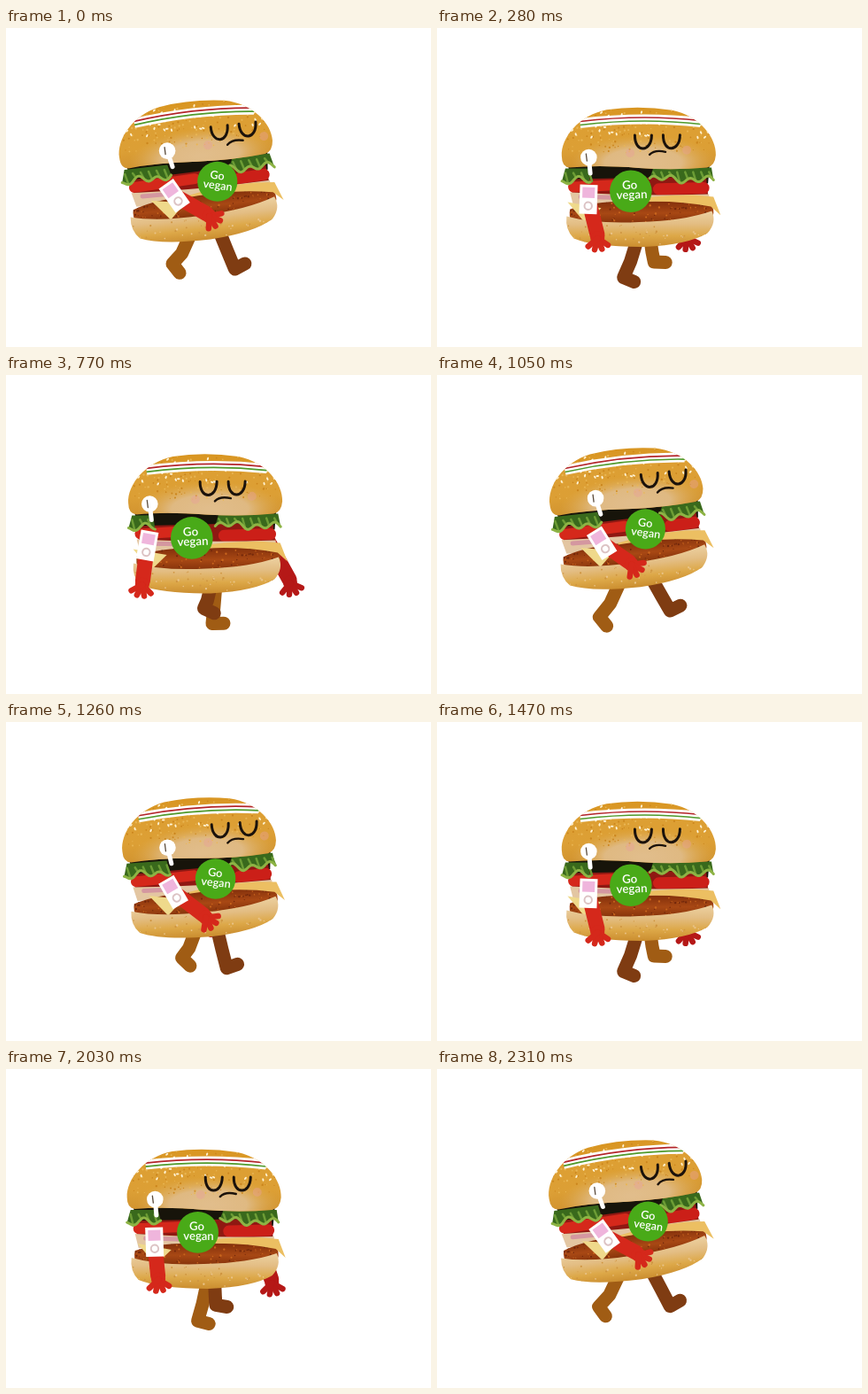
These frames come from a looping animation (480x360 px, 2380 ms). An HTML page with a canvas:

```html
<!DOCTYPE html>
<html lang="en">
<head>
<meta charset="utf-8">
<title>Walking burger</title>
<style>
html, body { margin: 0; width: 100%; height: 100%; overflow: hidden; background: #fff; }
canvas { display: block; }
</style>
</head>
<body>
<canvas id="stage" width="480" height="360"></canvas>
<script>
const ctx = document.getElementById('stage').getContext('2d');
const STEP = 70, CYCLE = 17;
const RED = '#d5281b', FAR_RED = '#b51817', INK = '#1b120b';
const TOP = 'M-87-32C-88-53-67-78-36-84Q0-89 38-83C70-76 88-51 87-32Q86-20 77-18Q40-15 0-18Q-45-22-78-19Q-87-20-87-32Z';
const BASE = 'M-82 36Q-50 45 0 43Q50 42 82 31Q88 44 77 56Q55 69 5 71Q-50 71-74 61Q-84 51-82 36Z';

const { sin, cos, PI } = Math;
const rad = deg => deg * PI / 180;

function seeded(s) {
  return () => (s = (s * 16807) % 2147483647) / 2147483647;
}

function at(x, y, deg, draw) {
  ctx.save();
  ctx.translate(x, y);
  ctx.rotate(rad(deg));
  draw();
  ctx.restore();
}
function disc(x, y, r, color, ry = r) {
  ctx.fillStyle = color;
  ctx.beginPath();
  ctx.ellipse(x, y, r, ry, 0, 0, 7);
  ctx.fill();
}
function line(color, width, ...pts) {
  ctx.strokeStyle = color;
  ctx.lineWidth = width;
  ctx.lineCap = ctx.lineJoin = 'round';
  ctx.beginPath();
  for (let i = 0; i < pts.length; i += 2) ctx.lineTo(pts[i], pts[i + 1]);
  ctx.stroke();
}
function curve(color, width, d) {
  ctx.strokeStyle = color;
  ctx.lineWidth = width;
  ctx.stroke(new Path2D(d));
}
function shape(color, d) {
  ctx.fillStyle = color;
  ctx.fill(new Path2D(d));
}
function blend(gradient, ...colors) {
  colors.forEach((c, i) => gradient.addColorStop(i / (colors.length - 1), c));
  return gradient;
}
function shade(y0, y1, ...colors) {
  return blend(ctx.createLinearGradient(0, y0, 0, y1), ...colors);
}
function speckle(seed, count, y, h, ...colors) {
  const rnd = seeded(seed);
  for (let i = 0; i < count; i++)
    disc(160 * rnd() - 80, y + h * rnd(), 0.5 + 0.7 * rnd(), colors[i % colors.length]);
}
function clipped(d, draw) {
  ctx.save();
  ctx.clip(new Path2D(d));
  draw();
  ctx.restore();
}

function hand(x, y, deg, color) {
  at(x, y, deg, () => {
    disc(4, 0, 8, color);
    for (let a = -48; a <= 48; a += 32)
      line(color, 6.5, 4, 0, 3 + 14 * cos(rad(a)), 15 * sin(rad(a)));
  });
}

function lettuce(from, to) {
  const edge = x => -6 + 3 * sin(x * 0.3) + 2 * sin(x * 0.13 + 1) + x * x / 2500;
  const rim = [];
  for (let x = from; x <= to; x += 2) rim.push(x, edge(x));
  ctx.fillStyle = '#39691c';
  ctx.beginPath();
  ctx.moveTo(from + 4, -18);
  for (let i = 0; i < rim.length; i += 2) ctx.lineTo(rim[i], rim[i + 1]);
  ctx.lineTo(to - 4, -18);
  ctx.fill();
  for (let x = from + 4; x < to - 2; x += 9) line('#6c9c35', 2.5, x, -13, x + 3, edge(x + 3));
  line('#8db344', 3, ...rim);
}

function filling(turn) {
  const gapL = turn - 75, gapR = turn - 9;
  shape('#17140a', 'M-80-22L80-22L78 0L-76 0Z');
  shape('#8f1812', 'M-74-6L76-8L78 14L-76 12Z');
  line(RED, 12, -74, 3, gapL + 25, 1);
  line('#cb1f18', 13, gapR + 10, 6, 73, 5);
  shape('#e3c6a2', 'M-78 9Q0 14 79 12L80 26L-74 25Z');
  line('#d497a0', 5, -66, 14, -28, 15);
  // patty
  clipped('M-78 28Q-50 18 0 20Q60 18 82 24Q87 35 80 42Q0 52-76 43Q-80 36-78 28Z', () => {
    ctx.fillStyle = shade(18, 48, '#7d2c0a', '#a84814', '#7a2c08');
    ctx.fillRect(-90, 15, 180, 40);
    speckle(41, 110, 20, 26, '#c9651d', '#71270b');
  });
  // cheese
  shape('#ecbf62', 'M-15 19Q20 12 62 13L84 15L92 36L81 26Q35 17-15 21Z');
  const x = turn - 82;
  shape(turn > 16 ? '#efd98b' : '#fff', `M${x - 20} 20L${x + 18} 27L${x} 44Z`);
  lettuce(-87, gapL);
  lettuce(gapR, 86);
}

function bottomBun() {
  clipped(BASE, () => {
    ctx.fillStyle = shade(32, 72, '#ecd0a0', '#e3bd83', '#dda848', '#c98b2d');
    ctx.fillRect(-90, 28, 180, 50);
    speckle(23, 50, 46, 24, '#cf9540', '#e9c388');
  });
}

function topBun() {
  clipped(TOP, () => {
    ctx.fillStyle = shade(-88, -15, '#d8941f', '#dd9f33', '#dc9f35', '#d0922f');
    ctx.fillRect(-90, -90, 180, 80);
    ctx.save();
    ctx.translate(5, -24);
    ctx.scale(1, 0.38);
    ctx.fillStyle = blend(ctx.createRadialGradient(0, 0, 5, 0, 0, 82),
      '#e1bd8b', '#dfb982', 'rgba(221,170,80,0)');
    ctx.fillRect(-90, -90, 180, 180);
    ctx.restore();
    speckle(5, 170, -84, 50, '#cc861d', '#e9b654');
    const rnd = seeded(11);
    for (let i = 0; i < 42; i++)
      at(156 * rnd() - 78, -84 + 32 * rnd(), 180 * rnd(), () => disc(0, 0, 1.8, '#fff2d2', 1));
    ctx.lineCap = 'butt';
    const stripe = (color, w, y) => curve(color, w, `M-66 ${y}Q4 ${y - 8} 70 ${y}`);
    stripe('#fff', 11, -69);
    stripe('#b3242a', 1.7, -71);
    stripe('#4f9a2c', 1.7, -67);
  });
}

function face(turn) {
  at(turn, -47, 0, () => {
    ctx.globalAlpha = 0.4;
    disc(-31, 12, 5, '#e9a09a');
    disc(33, 9, 5, '#e9a09a');
    ctx.globalAlpha = 1;
    ctx.lineCap = 'round';
    for (const x of [-16, 16])
      curve(INK, 3, `M${x - 9.5}-8C${x - 10} 12 ${x + 9} 12 ${x + 9.5}-8`);
    curve(INK, 2.4, 'M-9 14Q-3 8 9 11');
  });
}

function badge(x, y, r, tilt) {
  disc(x, y, r, '#49aa18');
  at(x, y, tilt, () => {
    ctx.fillStyle = '#fff';
    ctx.textAlign = 'center';
    ctx.font = `600 ${r * 0.56}px Lato, sans-serif`;
    ctx.fillText('Go', -1, -2.5);
    ctx.fillText('vegan', 1, 8.5);
  });
}

function earphone(x, y, lean) {
  line('#fff', 5, x, y, x + lean, y + 18);
  disc(x, y, 9.3, '#fff');
  line('#5a4a3a', 1.3, x - 3, y - 4, x - 2, y + 4);
}

function player(x, y, tilt) {
  at(x, y, tilt, () => {
    ctx.fillStyle = '#fff';
    ctx.fillRect(-10, -16, 20, 33);
    ctx.fillStyle = '#efb5dc';
    ctx.fillRect(-7, -13, 14, 12);
    ctx.strokeStyle = '#dcc3c4';
    ctx.lineWidth = 2;
    ctx.beginPath();
    ctx.arc(0, 8, 4.2, 0, 7);
    ctx.stroke();
  });
}

// c, s: the leg's own swing; sway, bob: motion shared with the body
function leg(color, c, s, sway, bob, bodyY) {
  const hipX = 232 + 18 * c - 3 * s - 7 * sway, hipY = bodyY + 62;
  const x = 227 + 40 * c - 8 * s - 4 * sway;
  const y = 268.5 - 6.5 * bob + 9 * s + 6 * sway;
  const toe = rad(12 - 42 * c);
  line(color, 15, hipX, hipY, (hipX + x) / 2, (hipY + y) / 2 + 3 - 3 * c,
    x, y, x + 13 * cos(toe), y + 13 * sin(toe));
}

function draw(step) {
  const a = 2 * PI * (step + 0.9) / CYCLE;
  const c = cos(a), s = sin(a), bob = cos(2 * a);
  const x = 224 - 5.5 * c + 1.5 * s - 1.5 * bob;
  const y = 171.5 - 5.5 * bob + 1.5 * c;
  const turn = 26 + 20 * c;

  ctx.fillStyle = '#fff';
  ctx.fillRect(0, 0, 480, 360);

  const farX = 285 - 58 * c - 18 * s, farY = 219 - 18 * bob + 9 * c;
  line(FAR_RED, 17, 278 - 22 * c, y - 8, farX, farY);
  hand(farX, farY, 65 + 8 * c - 17 * bob, FAR_RED);

  leg('#a05c14', -c, -s, c, bob, y);
  leg('#7f3c12', c, s, c, bob, y);

  at(x, y, -3.6 - 3.6 * bob, () => {
    filling(turn);
    bottomBun();
    topBun();
    face(turn);
  });

  earphone(168.5 + 15.5 * c + 4 * s - 3 * bob, y - 30, 4 + 2.5 * bob);
  badge(219.5 + 19 * c + 4 * s, y + 7.5 - 3 * c, 23.5 - c, 8 * c);

  const armX = 169.5 + 21.5 * c + 5 * s - 2 * bob, armY = y + 17.5 + 3 * c;
  const wristX = 179 + 48 * c + 12 * s - 2 * bob, wristY = 222 - 12 * bob - 3 * c;
  line(RED, 17, armX, armY, wristX, wristY);
  hand(wristX, wristY, 81 - 41 * c - 5 * s, RED);
  player(armX, armY, -3 - 33 * c - 3 * s);
}

const start = performance.now();
function tick() {
  draw(Math.floor((performance.now() - start) / STEP) % CYCLE);
  requestAnimationFrame(tick);
}
tick();
</script>
</body>
</html>
```
